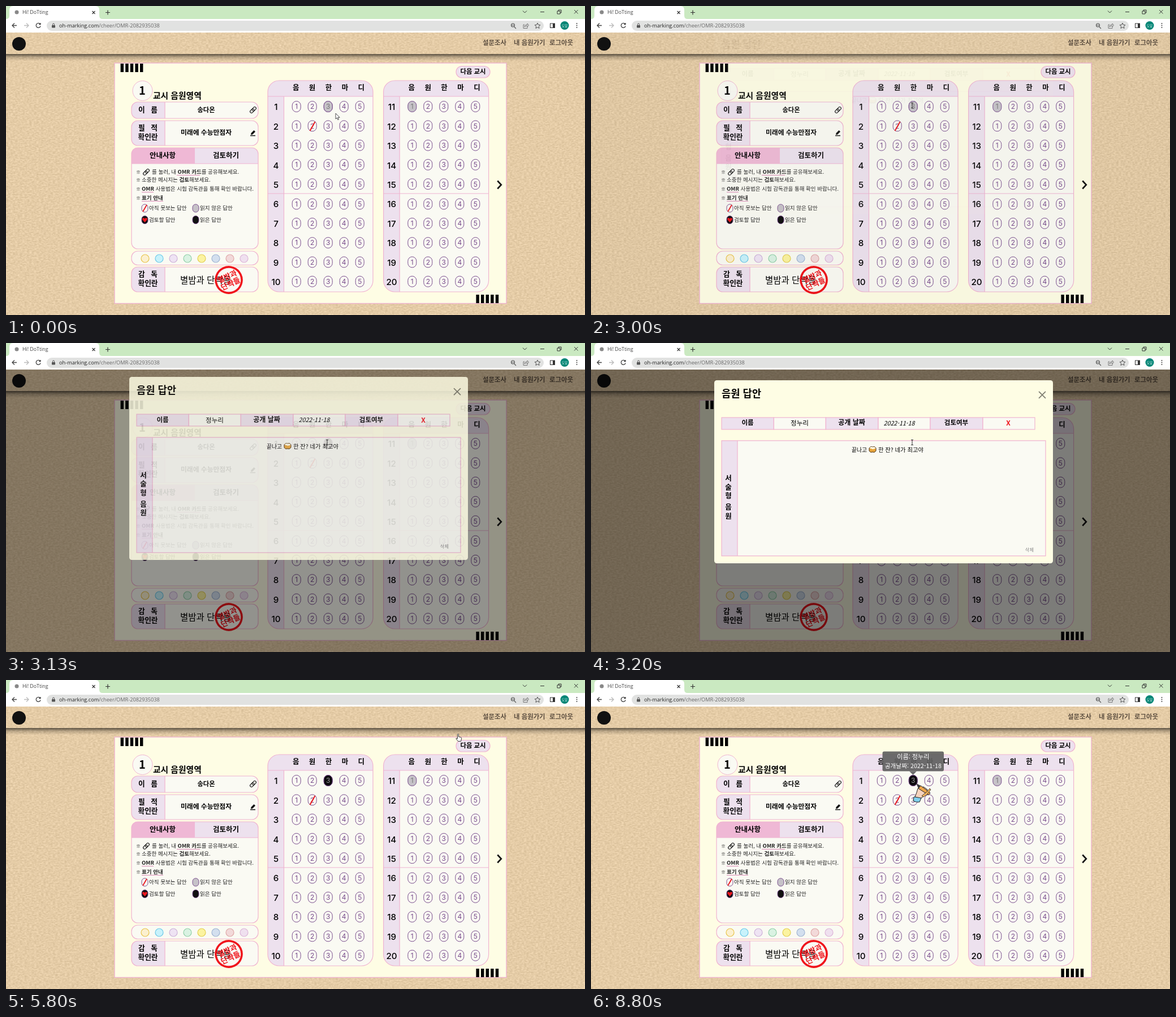
Recreate the animation shown at these times as an HTML page. Size 1024 px wide and 547 px high, loop 8930 ms.

```html
<!DOCTYPE html>
<html lang="ko">
<head>
<meta charset="utf-8">
<title>OMR</title>
<style>
html, body { margin: 0; width: 100%; height: 100%; overflow: hidden; background: #e4cba3; }
svg { position: absolute; left: 0; top: 0; width: 100%; height: 100%; }
#paper { will-change: transform; }
text { font-family: "Noto Sans CJK KR", "Noto Sans CJK JP", "Noto Sans CJK", sans-serif; white-space: pre; }
.digit { font-family: Inter, sans-serif; }
.chrome { font-family: "Open Sans", sans-serif; }
</style>
</head>
<body>
<svg id="paper" viewBox="0 0 1024 547">
  <filter id="grain" x="0" y="0" width="1" height="1" color-interpolation-filters="sRGB">
    <feTurbulence type="fractalNoise" baseFrequency=".24 .42" numOctaves="3" seed="4"/>
    <feColorMatrix values=".17 0 0 0 .812  .17 0 0 0 .714  .18 0 0 0 .562  0 0 0 0 1"/>
  </filter>
  <rect y="47" width="1024" height="500" filter="url(#grain)"/>
</svg>
<svg id="stage" viewBox="0 0 1024 547"></svg>
<script>
const LOOP = 8930;
const PINK = '#f0b4d1', LILAC = '#ede1ee', CREAM = '#fefde4', WHITE = '#fafaf3', PURPLE = '#774a8c';
const OWNER = '송다온', SENDER = '정누리', TEAM = ['별밤과', '단짝들'];

const rect = (x, y, w, h, fill, attrs = '') =>
  `<rect x="${x}" y="${y}" width="${w}" height="${h}" fill="${fill}" ${attrs}/>`;
const line = (d, color = PINK, width = 1.2, attrs = '') =>
  `<path d="${d}" fill="none" stroke="${color}" stroke-width="${width}" ${attrs}/>`;
const circle = (x, y, r, fill, attrs = '') => `<circle cx="${x}" cy="${y}" r="${r}" fill="${fill}" ${attrs}/>`;
const text = (x, y, content, size, attrs = '') =>
  `<text x="${x}" y="${y}" font-size="${size}" ${/anchor/.test(attrs) ? '' : 'text-anchor="middle"'} ${
    /weight/.test(attrs) ? '' : 'font-weight="700"'} ${attrs}>${content}</text>`;
const LEFT = 'text-anchor="start"', REGULAR = 'font-weight="400"';

let clipCount = 0;
function panel(x, y, w, h, r, inner = '') {
  const id = 'clip' + clipCount++;
  return `<clipPath id="${id}">${rect(x, y, w, h, '#000', `rx="${r}"`)}</clipPath>
    <g clip-path="url(#${id})">${rect(x, y, w, h, WHITE)}${inner}</g>
    ${rect(x, y, w, h, 'none', `rx="${r}" stroke="${PINK}" stroke-width="1.2"`)}`;
}

const linkIcon = (x, y) => `<g transform="translate(${x} ${y}) rotate(-45)">` +
  [-6.5, -1.5].map(left => rect(left, -2.5, 8, 5, 'none', 'rx="2.5" stroke="#111" stroke-width="1.1"')).join('') + '</g>';

function browser() {
  const tab = 'M0 23Q6 23 6 17V7Q6 0 13 0H158Q165 0 165 7V17Q165 23 171 23Z';
  return rect(0, 0, 1024, 23, '#cae9c1') + `<path d="${tab}" fill="#fff"/>` + rect(0, 23, 1024, 24, '#fff') +
    circle(19, 11, 3.5, '#888') +
    text(29, 14, 'Hi! DoTting', 8.8, `class="chrome" fill="#444" ${LEFT} ${REGULAR}`) +
    line('M152.500 9l5 5m0-5l-5 5M176 11.500h8m-4-4v8', '#333', 1.2) +
    line('M914 8.500l3.500 3.500 3.500-3.500M945 10.500h7M975 9h5v5h-5zM977 9V7h5v5h-2M1005 7l6.500 6.500m0-6.500l-6.500 6.500', '#333', 1) +
    line('M19 34.500h-8m4-4l-4 4 4 4', '#444', 1.3) + line('M32 34.500h8m-4-4l4 4-4 4', '#bbb', 1.3) +
    line('M60.500 32a4 4 0 1 0 .6 3.500M61 30v2.500h-2.700', '#444', 1.3) +
    rect(72, 26, 879, 18, '#e1e2e1', 'rx="9"') +
    rect(81, 34, 6, 4.500, '#555', 'rx=".8"') + line('M82.500 34v-1.500a1.500 1.500 0 0 1 3 0V34', '#555', 1) +
    text(94, 38.300, 'oh-marking.com<tspan fill="#666">/cheer/OMR-2082935038</tspan>', 9.2,
      `class="chrome" fill="#222" ${LEFT} ${REGULAR}`) +
    line('M899 37l3 3M894.500 34h4M899.500 34a3 3 0 1 1-6 0a3 3 0 1 1 6 0', '#555', 1.1) +
    line('M917 33h-2v6.500h7V37M917 37q0-4 5-4v-2l2.500 3-2.500 3v-2q-3 0-5 2', '#777', 1) +
    line('M940 30l1.400 3.300 3.600.3-2.700 2.400.8 3.500-3.100-1.900-3.100 1.900.8-3.500-2.700-2.400 3.600-.3z', '#555', 1) +
    rect(962.5, 31, 8, 7.500, 'none', 'stroke="#333"') + rect(967, 31, 3.500, 7.500, '#333') +
    circle(988, 34.500, 7.500, '#008575') + text(988, 36.6, '도담', 5.6, `fill="#fff" ${REGULAR}`) +
    [31, 34.5, 38].map(y => circle(1009.5, y, 1, '#444')).join('');
}

function header() {
  const nav = (x, label) => text(x, 69, label, 11.4, `fill="#5d4f40" ${LEFT}`);
  return `<linearGradient id="shade" x2="0" y2="1"><stop stop-opacity=".6"/><stop offset=".45" stop-opacity=".2"/>
    <stop offset="1" stop-opacity="0"/></linearGradient>` + rect(0, 85, 1024, 12, 'url(#shade)') +
    circle(23, 67, 12, '#111') + nav(843, '설문조사') + nav(898, '내 음원가기') + nav(961, '로그아웃');
}

const pill = (x, y, fill, w = 15, h = 19) =>
  rect(x - w / 2, y - h / 2, w, h, fill, `rx="${w / 2}" stroke="${PURPLE}"`);
const bubble = (x, y, n, fill = 'none', color = PURPLE) =>
  pill(x, y, fill) + text(x, y + 4.3, n, 12, `class="digit" fill="${color}" ${REGULAR}`);
const bubbleY = i => 178 + 34.3 * i + (i < 5 ? 0 : 1);

function answerTable(x, firstNumber) {
  let out = rect(x, 132, 186, 28, LILAC) + rect(x, 132, 28.5, 375, LILAC) +
    line(`M${x} 160h186M${x + 28.5} 160v347M${x} 332h186`);
  [...'음원한마디'].forEach((c, i) => out += text(x + 49.7 + 28.9 * i, 149, c, 12.5));
  for (let i = 0; i < 10; i++) {
    out += text(x + 14.5, 184.2 + 34.45 * i, firstNumber + i, 15.2, 'class="digit" font-weight="500"');
    for (let n = 1; n <= 5; n++) {
      const unread = firstNumber === 11 && i === 0 && n === 1;
      out += bubble(x + 22.7 + 28 * n, bubbleY(i), n, unread ? '#c6c2c8' : 'none', unread ? '#777' : PURPLE);
    }
  }
  return panel(x, 132, 186, 374, 20, out);
}

function guide() {
  const strong = s => `<tspan font-weight="700">${s}</tspan>`;
  const row = (x, y, s) => text(x, y, s, 9.5, `fill="#222" ${LEFT} ${REGULAR}`);
  const marks = [297, 311, 327, 343].map(y => text(234, y, '※', 7.5, 'font-weight="900"')).join('');
  return panel(222, 251, 224, 179, 11,
    rect(222, 251, 112, 28, '#efb8d5') + rect(334, 251, 112, 28, LILAC) + line('M222 279h224')) +
    text(277, 269, '안내사항', 12.5) + text(389, 269, '검토하기', 12.5) + marks + linkIcon(248, 294) +
    line('M302 299.500h41M240 329.500h21M240 345.500h38', '#d987b4', 1) +
    row(258, 297, `를 눌러, 내 ${strong('OMR 카드')}를 공유해보세요.`) +
    row(240, 311, `소중한 메시지는 ${strong('검토')}해보세요.`) +
    row(240, 327, `${strong('OMR')} 사용법은 시험 감독관을 통해 확인 바랍니다.`) +
    row(240, 343, strong('표기 안내')) +
    pill(245.5, 358, 'none', 11, 14) + line('M242 364l7-12', '#e8141c', 1.8) + row(253, 361, '아직 못보는 답안') +
    pill(335.5, 358, '#c6c2c8', 11, 14) + row(343, 361, '읽지 않은 답안') +
    pill(245.5, 378.5, '#111', 11, 14) +
    '<path d="M245.500 383l-4-4.500q-1-3 1.500-3.500 2 0 2.500 2 .5-2 2.500-2 2.500.5 1.500 3.500z" fill="#f01820"/>' +
    row(253, 382, '검토할 답안') + pill(335.5, 378.5, '#111', 11, 14) + row(343, 382, '읽은 답안');
}

function card() {
  const bars = (x, y) => [0, 1, 2, 3, 4].map(i => rect(x + 8.6 * i, y, 5.4, 15, '#000')).join('');
  const labelled = (y, h) => panel(222, y, 224, h, 11, rect(222, y, 59, h, LILAC) + line(`M281 ${y}v${h}`));
  const spaced = (y, [first, last]) => text(251, y, `${first}\u00a0\u00a0\u00a0${last}`, 12.7);
  const swatches = ['#fbf0cf #e8c34a', '#c8f2fb #6cc9e8', '#eee3f3 #cdb0d8', '#d9f2e2 #90d0a8',
    '#fbf3a0 #e3cf50', '#d3dfee #9fb4d3', '#f2d9d9 #dfa6a6', '#efe0ef #dcb4d8'];
  return rect(192, 101, 693, 425.5, CREAM, `stroke="${PINK}" stroke-width="1.4"`) +
    bars(202.6, 102) + bars(831.4, 511) +
    rect(796, 106.5, 60, 20.5, LILAC, `rx="10.2" stroke="${PINK}" stroke-width="1.2"`) + text(826, 119.5, '다음 교시', 11.4) +
    circle(241.5, 150, 17.5, WHITE, `stroke="${PINK}"`) +
    text(241, 157, '1', 20, 'font-weight="900"') + text(260, 164, '교시 음원영역', 14.8, LEFT) +
    labelled(170, 29) + spaced(188, '이름') + text(354, 188, OWNER, 11.3) + linkIcon(437, 184) +
    labelled(203, 44) + spaced(220, '필적') + text(251, 235.5, '확인란', 12.7) +
    text(354, 228, '미래에 수능만점자', 11.8) +
    '<path d="M433 228l.5-3 5-5 2.500 2.500-5 5z" fill="#111"/>' + line('M432 229.500h9', '#111', 1.5) +
    guide() + panel(222, 434, 224, 24.5, 11) +
    swatches.map((pair, i) => {
      const [fill, stroke] = pair.split(' ');
      return circle(246 + 25 * i, 447, 7, fill, `stroke="${stroke}" stroke-width="1.2"`);
    }).join('') +
    labelled(462, 44) + spaced(479, '감독') + text(251, 494.5, '확인란', 12.7) +
    text(308, 491, TEAM.join(' '), 15.5, `font-weight="300" ${LEFT}`) +
    `<g transform="translate(394 485) rotate(-25)" fill="#f0141c">` +
    circle(0, 0, 23, 'none', 'stroke="#f0141c" stroke-width="3.6"') +
    text(0, -2, TEAM[0], 13) + text(0, 12, TEAM[1], 13) + '</g>' +
    answerTable(463, 1) + answerTable(667.6, 11) + line('M537.500 221l9-16', '#e8141c', 2) +
    line('M869.300 309.500l6.500 7-6.500 7', '#111', 2.6);
}

function modal() {
  const columns = [231, 323.3, 415.3, 508, 600, 693, 785];
  const cells = columns.slice(0, 6).map((x, i) =>
    rect(x, 136, columns[i + 1] - x, 21, i % 2 ? WHITE : LILAC, `stroke="${PINK}" stroke-width="1.2"`)).join('');
  return rect(218, 70, 599, 324, CREAM, 'rx="4.500"') + text(231, 100, '음원 답안', 17.7, LEFT) +
    rect(783.6, 81.6, 28.8, 28.8, 'none', 'id="ring" rx="4" stroke="#0d6efd" stroke-opacity=".25" stroke-width="3.200"') +
    line('M792.500 90.500l11 11m0-11l-11 11', '#000', 1.7, 'id="close" stroke-linecap="round"') + cells +
    text(277, 149.5, '이름', 11.5) + text(461, 149.5, '공개 날짜', 12) + text(646, 149.5, '검토여부', 11.5) +
    text(369, 150.5, SENDER, 11.6, REGULAR) + text(545, 150, '2022-11-18', 10.7, `font-style="italic" ${REGULAR}`) +
    text(738, 150.5, 'X', 12, 'fill="#f0141c"') +
    rect(231, 177, 573, 204, WHITE) + rect(231, 177, 28, 204, LILAC) +
    line('M259 177v204M231 177h573v204H231z') +
    [...'서술형음원'].map((c, i) => text(243, [248.5, 264, 279.5, 299.5, 315][i], c, 12.5)).join('') +
    text(461, 197, '끝나고', 9.8, `${LEFT} ${REGULAR}`) + text(508, 197, '한 잔? 네가 최고야', 10.3, `${LEFT} ${REGULAR}`) +
    '<path d="M492 190q3-4 6-2 4-2 6 2v5q-3 4-6 2-4 2-6-2z" fill="#e9a63c" stroke="#4a3520"/>' +
    '<path d="M492.500 190q3-3.500 5.500-1.500 4-1.500 5.500 2l-5 1.500z" fill="#fffbea"/>' +
    text(775.5, 373, '삭제', 8.3, `fill="#888" ${REGULAR}`);
}

const tooltip = () => rect(515.5, 126.5, 108.5, 35, '#616161', 'rx="3" fill-opacity=".93"') +
  '<path d="M563 161.500h13l-6.500 6.500z" fill="#616161" fill-opacity=".93"/>' +
  text(569.8, 140, `이름: ${SENDER}`, 11.1, `fill="#fff" ${REGULAR}`) +
  text(569.8, 156, '공개날짜: 2022-11-18', 10.7, `fill="#fff" ${REGULAR}`);

const cursors = {
  arrow: '<path d="M0 0v10l2.300-2.100 1.600 3.600 1.600-.7-1.500-3.500h3.200z" fill="#fff" stroke="#222" stroke-width=".8"/>',
  hand: '<path d="M-1 1a1 1 0 0 1 2 0v4l4 1q1.400.4 1.200 2L5 13H0l-3.500-4.500q0-1.600 1.600-.9L-1 8.700z" fill="#fff" stroke="#222" stroke-width=".9"/>',
  beam: line('M-2 -4.500h4M0 -4.500v9M-2 4.500h4', '#333', 1),
  pencil: `<path d="M-4 24l12-1 1 3-3 7q-6 1-11-2z" fill="#7fd0ee" stroke="#222"/>
    <path d="M3 9l10-3 7 5-3 9-8 6-11-2 3-8z" fill="#f6d3bd" stroke="#222"/>
    <path d="M0 0l8 4-4 5z" fill="#3b3b40"/>
    <path d="M8 4l17 13-3 3.500L4 9z" fill="#eda64a" stroke="#222"/>
    <path d="M10 22l10-8 4-5 2 2-7 9-6 4z" fill="#f0b35c" stroke="#222" stroke-width=".8"/>`
};

const group = (id, content) => `<g id="${id}">${content}</g>`;
const stage = document.getElementById('stage');
stage.innerHTML = header() + card() +
  group('unread', bubble(569.7, 178, 3, '#c6c2c8', '#777')) + group('read', bubble(569.7, 178, 3, '#0c0a0e', '#999')) +
  group('tip', tooltip()) + rect(0, 47, 1024, 500, '#000', 'id="backdrop"') + group('modal', modal()) + browser() +
  Object.entries(cursors).map(([kind, shape]) => group(kind, shape)).join('');

// Pointer path: time, x, y; positions between are linear.
const path = [[0, 583, 190], [770, 583, 190], [870, 581, 188], [1069, 581, 188], [1070, 576, 182], [1560, 568, 176],
  [4290, 568, 176], [4540, 622, 166], [4800, 712.5, 138.5], [5000, 770, 114], [5200, 804, 98], [5230, 804, 98],
  [5400, 799.5, 95.5], [6690, 799.5, 95.5], [6900, 720, 142], [7130, 600, 202], [7330, 580, 196],
  [7830, 580, 196], [8000, 578, 188], [8269, 578, 188], [8270, 576, 185], [8800, 575, 183], [LOOP, 575, 183]];
const kinds = [[0, 'arrow'], [1070, 'pencil'], [3000, 'beam'], [4400, 'arrow'], [4740, 'hand'], [4900, 'arrow'],
  [5130, 'hand'], [5870, 'arrow'], [8270, 'pencil']];

const el = id => document.getElementById(id);
const show = (id, opacity) => {
  el(id).style.opacity = opacity;
  el(id).style.visibility = opacity ? 'visible' : 'hidden';
};
const ramp = (t, start, length) => Math.min(1, Math.max(0, (t - start) / length));

function render(t) {
  const next = path.findIndex(p => p[0] > t);
  const [t0, x0, y0] = path[next - 1], [t1, x1, y1] = path[next];
  const k = (t - t0) / (t1 - t0);
  const kind = kinds.filter(entry => entry[0] <= t).pop()[1];
  for (const name in cursors) show(name, +(name === kind));
  el(kind).setAttribute('transform', `translate(${x0 + (x1 - x0) * k} ${y0 + (y1 - y0) * k})`);

  show('unread', +(t < 3070));
  show('read', +(t >= 3070));
  show('tip', t < 3000 ? ramp(t, 1100, 200) * (1 - ramp(t, 2900, 80)) : ramp(t, 8300, 200));

  const opening = 2993, open = t < 5800;
  const fade = open ? ramp(t, opening, 165) : 0;
  show('backdrop', fade * 0.5);
  show('modal', fade);
  el('modal').setAttribute('transform', `translate(0 ${-26.7 * (1 - ramp(t, opening, 300)) ** 1.6})`);
  show('ring', open && t >= 5600 ? 1 : 0);
  el('close').style.opacity = t >= 5600 ? 1 : t >= 5130 ? 0.75 : 0.5;
}

const started = performance.now();
function tick() {
  render((performance.now() - started) % LOOP);
  requestAnimationFrame(tick);
}
tick();
</script>
</body>
</html>
```
